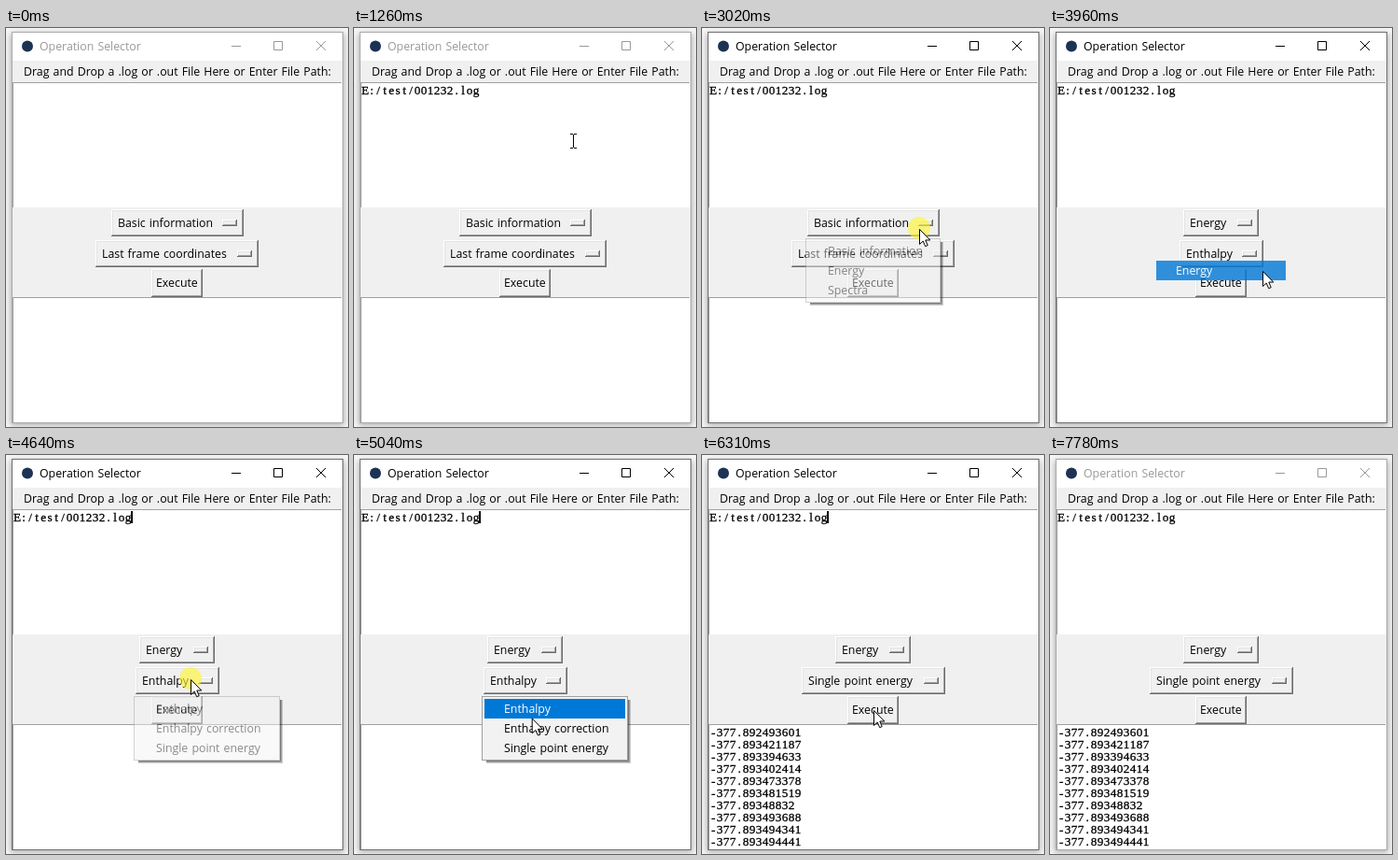
These frames come from a looping animation (367 px wide and 427 px high, 7830 ms). An HTML page:

```html
<!DOCTYPE html>
<html lang="en">
<head>
<meta charset="utf-8">
<title>Operation Selector</title>
<style>
  html, body { margin: 0; width: 100%; height: 100%; overflow: hidden; background: #f6f6f6; }
  svg { display: block; }
  text { font: 12.35px "Open Sans", "Noto Sans", sans-serif; word-spacing: .9px; white-space: pre; }
  .mono { font: 13.2px "Liberation Serif", "Noto Serif", serif; text-anchor: middle; stroke: #000; stroke-width: .3px; }
</style>
</head>
<body>
<svg width="367" height="427" viewBox="0 0 367 427">
  <defs>
    <filter id="soft" x="-10%" y="-10%" width="120%" height="120%"><feGaussianBlur stdDeviation="3"/></filter>
  </defs>
  <rect x="5" y="6" width="358" height="419" fill="#000" opacity=".3" filter="url(#soft)"/>
  <g id="scene"></g>
</svg>
<script>
const LOOP = 7830, STEP = 65;
const DROP = 1260, FOCUS = 2200, BLUR = 7780, RESULT = 6310;
const FACE = '#f0f0f0', BLUE = '#0078d7';
const scene = document.getElementById('scene');

const MENUS = [
  { x: 111, y: 225, w: 145, open: 3020, pick: 3960, chosen: 1,
    items: ['Basic information', 'Energy', 'Spectra'] },
  { x: 137, y: 258, w: 157, open: 4640, pick: 5890, chosen: 2,
    items: ['Enthalpy', 'Enthalpy correction', 'Single point energy'] }
];
const [TYPE, DETAIL] = MENUS;

// The cursor rests at each stop and glides on to the next
const STOPS = [
  { x: 292, y: 116, at: 860, until: 860 },
  { x: 235, y: 113, at: 920, until: DROP - 1 },
  { x: 235, y: 121, at: DROP, until: 1389 },
  { x: 240, y: 176, at: 1390, until: 1660 },
  { x: 237, y: 214, at: 1855, until: 2130 },
  { x: 233, y: 215, at: 2195, until: 2410, press: FOCUS, release: 2410 },
  { x: 233, y: 215, at: 2410, until: 3140, press: TYPE.open, release: 3140 },
  { x: 228, y: 260, at: 3725, until: 4160, press: 3890, release: TYPE.pick },
  { x: 198, y: 240, at: 4550, until: 4700, press: DETAIL.open, release: 4760 },
  { x: 189, y: 291, at: 5150, until: 5500 },
  { x: 183, y: 310, at: 5700, until: 5950, press: 5760, release: DETAIL.pick },
  { x: 184, y: 273, at: 6210, until: 6520, press: 6240, release: RESULT },
  { x: 332, y: 430, at: 6845, until: 6845 }
];

const RESULTS = `892493601 893421187 893394633 893402414 893473378
  893481519 89348832 893493688 893494341 893494441`.split(/\s+/).map(d => '-377.' + d);

const within = (t, a, b) => t >= a && t < b;
const clamp = v => Math.max(0, Math.min(1, v));
const smooth = k => k * k * (3 - 2 * k);
const stepped = t => Math.floor(t / STEP) * STEP;
const mix = (a, b, k) => a + (b - a) * k;

const rect = (x, y, w, h, fill, extra = '') =>
  `<rect x="${x}" y="${y}" width="${w}" height="${h}" fill="${fill}" ${extra}/>`;
const text = (x, y, s, fill = '#000') => `<text x="${x}" y="${y}" fill="${fill}">${s}</text>`;
const path = (d, stroke, extra = '') => `<path d="${d}" fill="none" stroke="${stroke}" ${extra}/>`;
const group = (opacity, body) => `<g opacity="${opacity}">${body}</g>`;

// One glyph per 7 px cell
function mono(x, y, s) {
  const cells = [...s].map((c, i) => x + 3.5 + 7 * i).join(' ');
  return `<text class="mono" x="${cells}" y="${y}">${s}</text>`;
}

function raised(x, y, w, h) {
  return rect(x, y, w, h, '#696969') + rect(x, y, w - 1, h - 1, '#fff') +
    rect(x + 1, y + 1, w - 2, h - 2, '#a0a0a0') + rect(x + 1, y + 1, w - 3, h - 3, '#e3e3e3') +
    rect(x + 2, y + 2, w - 4, h - 4, FACE);
}

const centred = w => Math.floor(184 - w / 2);

function button(y, w, h, label, pad) {
  const x = centred(w);
  return raised(x, y, w, h) + text(x + pad, y + 19, label);
}

function option(y, w, label) {
  return button(y, w, 29, label, 7) + raised(centred(w) + w - 23, y + 11, 16, 7);
}

function field(y, h) {
  return rect(7, y, 354, h, '#fff') + path(`M7 ${y + .5}H360M7.5 ${y}V${y + h}`, '#a0a0a0');
}

function frameBox(active) {
  const ink = active ? '#000' : '#999';
  return rect(6, 4, 356, 419, active ? '#707070' : '#aaa') + rect(7, 5, 354, 417, FACE) +
    rect(7, 5, 354, 30, '#fff') + '<circle cx="23" cy="19.5" r="6" fill="#1c3354"/>' +
    text(36, 24, 'Operation Selector', ink) +
    path('M242 19.5H252M287.5 14.5H296.5V23.5H287.5Z', ink) +
    path('M333 14L343 24M343 14L333 24', ink) +
    text(19, 51, 'Drag and Drop a .log or .out File Here or Enter File Path:');
}

function position(t) {
  const i = STOPS.findIndex(s => s.at > t);
  if (i < 1) return null;
  const a = STOPS[i - 1], b = STOPS[i];
  const k = smooth(clamp(stepped(t - a.until) / (b.at - a.until)));
  return { x: mix(a.x, b.x, k), y: mix(a.y, b.y, k) };
}

function menuItem(m, i, lit) {
  const y = m.y + 3 + 21 * i;
  return (lit ? rect(m.x + 3, y, m.w - 6, 21, BLUE) : '') +
    text(m.x + 24, y + 15, m.items[i], lit ? '#fff' : '#000');
}

function menu(m, t, at) {
  if (within(t, m.open, m.pick)) {
    const { x, y, w } = m, h = 69;
    const alpha = clamp(.45 + stepped(t - m.open) / 300);
    const hover = at ? Math.floor((at.y - y - 3) / 21) : -1;
    const shade = n => path(`M${x + 5} ${y + h + n}H${x + w + n}V${y + 4}`, '#000',
      `opacity="${.6 - .16 * n}"`);
    return [.5, 1.5, 2.5].map(shade).join('') + group(alpha,
      rect(x + .5, y + .5, w - 1, h - 1, '#f2f2f2', 'stroke="#a0a0a0"') +
      m.items.map((s, i) => menuItem(m, i, i === hover)).join(''));
  }
  // The picked row lingers briefly
  const left = .8 - stepped(t - m.pick) / 300;
  return t >= m.pick && left > 0 ? group(left, menuItem(m, m.chosen, true)) : '';
}

function pointer(t, { x, y }) {
  if (t >= DROP && y < 191) {
    const serif = dy => `M${x - 3} ${y + dy}H${x}M${x + 1} ${y + dy}H${x + 4}`;
    return path(serif(-7.5) + serif(7.5) + `M${x + .5} ${y - 7}V${y + 7}`, '#000');
  }
  const drag = t < DROP ? rect(x + 12, y + 18, 114, 36, '#e8eef4', 'opacity=".6"') : '';
  const pressed = STOPS.some(s => within(t, s.press, s.release));
  const halo = pressed ? `<circle cx="${x}" cy="${y - 1}" r="12" fill="#fff52e" opacity=".62"/>` : '';
  return drag + halo + `<path transform="translate(${x + .5} ${y + .5})" fill="#fff" stroke="#000"
    d="M0 0V16L3.7 12.5L6.2 18.2L8.7 17.1L6.3 11.5H11.3Z"/>`;
}

function draw(t) {
  const at = position(t), active = within(t, FOCUS, BLUR);
  let out = frameBox(active) + field(58, 134) + field(288, 134);
  if (t >= DROP) out += mono(8.6, 71, 'E:/test/001232.log');
  if (active && (t - FOCUS) % 925 < 615) out += rect(134, 60, 2, 13, '#000');

  out += t < TYPE.pick
    ? option(194, 142, 'Basic information') + option(227, 175, 'Last frame coordinates')
    : option(194, 81, 'Energy') +
      (t < DETAIL.pick ? option(227, 90, 'Enthalpy') : option(227, 154, 'Single point energy'));
  out += button(258, 55, 30, 'Execute', 5);
  if (t >= RESULT) out += RESULTS.map((s, i) => mono(8.6, 301 + 13 * i, s)).join('');

  out += MENUS.map(m => menu(m, t, at)).join('');
  return out + (at ? pointer(t, at) : '');
}

let shown = '';
const start = performance.now();
function tick() {
  const next = draw((performance.now() - start) % LOOP);
  if (next !== shown) scene.innerHTML = shown = next;
  requestAnimationFrame(tick);
}
tick();
</script>
</body>
</html>
```
